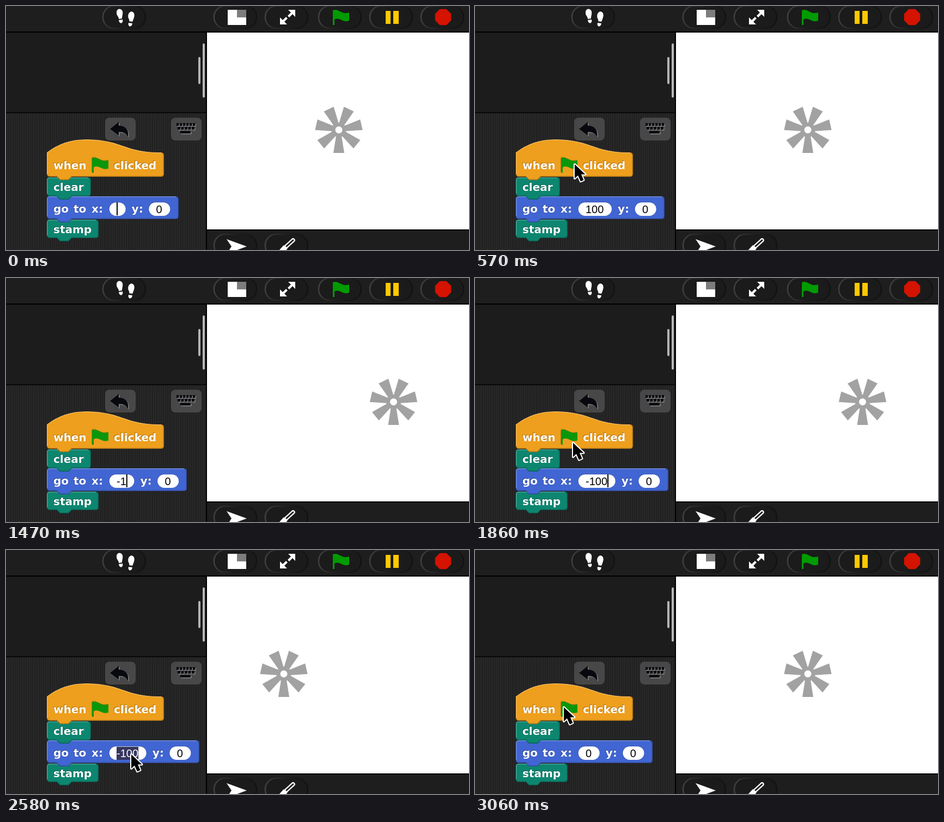
These frames come from a looping animation (850 by 450 pixels, 3180 ms). An HTML page with a canvas:

```html
<!DOCTYPE html>
<html lang="en">
<head>
<meta charset="utf-8">
<title>Block script demo</title>
<style>
  html, body { margin: 0; height: 100%; overflow: hidden; background: #1e1e1e; }
  canvas { display: block; }
</style>
</head>
<body>
<canvas id="view" width="850" height="450"></canvas>
<script>
const ctx = document.getElementById('view').getContext('2d');
const LOOP = 3180, STEP = 30;
const LABEL = 'bold 20px "DejaVu Sans", Verdana, sans-serif';
const NUMBER = '20px "Liberation Sans", Arial, sans-serif';
const ORANGE = '#ed9f1d', TEAL = '#0d8670', BLUE = '#4165d2';
const PLAIN = 0, CARET = 1, SELECTED = 2;

// time, value of x, state of the field
const edits = [
  [0, '', CARET], [120, '1', CARET], [210, '10', CARET], [300, '100', CARET],
  [510, '100', PLAIN], [1140, '100', SELECTED], [1350, '-', CARET],
  [1440, '-1', CARET], [1530, '-10', CARET], [1620, '-100', CARET],
  [1920, '-100', PLAIN], [2490, '-100', SELECTED], [2670, '', CARET],
  [2790, '0', CARET], [2970, '0', PLAIN]
];
// time, centre of the wheel
const moves = [[0, 611], [690, 711.5], [1980, 510], [3030, 611]];
// each trip of the pointer: time, x, y
const trips = [
  [[330, 228, 374], [540, 181, 289], [690, 181, 289], [930, 218, 342], [990, 222, 366], [1320, 222, 366]],
  [[1710, 222, 372], [1860, 178, 301], [1950, 175, 290], [2220, 175, 290], [2460, 228, 374], [2640, 228, 374]],
  [[2820, 228, 374], [3000, 161, 287], [3180, 161, 287]]
];

const shapes = {
  flag: new Path2D('M0 1C10-4 16 10 30 5V20C18 25 13 12 3 18V28H0Z'),
  pointer: new Path2D('M0 0V26L6 20.5L11 31.5L16.5 29L12 18.5H19.5Z'),
  expand: new Path2D('M518 7H531V20L526 15L520 21L517 18L523 12Z M516 34H503V21L508 26L514 20L517 23L511 29Z'),
  steps: new Path2D('M203 13C202 4 212 3 214 10C215 15 213 18 213 23L207 24C207 19 203 18 203 13Z M207 26L214 25C216 33 208 34 207 26Z M225 23C222 15 228 8 233 11C238 15 235 22 232 29L226 28C227 26 226 25 225 23Z M225 31L232 32C231 40 223 39 225 31Z'),
  turtle: new Path2D('M405 430L442 443.5L405 457L414 443.5Z'),
  undo: new Path2D('M191 227L207 214V220.5C220 221 226 229 224 241C220 234 215 232 207 232.5V239Z')
};

const latest = (list, t) => list.findLast(item => item[0] <= t);

function box(x, y, w, h, color) {
  ctx.fillStyle = color;
  ctx.fillRect(x, y, w, h);
}

function round(x, y, w, h, r, color) {
  ctx.beginPath();
  ctx.roundRect(x, y, w, h, r);
  ctx.fillStyle = color;
  ctx.fill();
}

function fill(path, color, x = 0, y = 0) {
  ctx.save();
  ctx.translate(x, y);
  ctx.fillStyle = color;
  ctx.fill(path);
  ctx.restore();
}

function polygon(points, color) {
  ctx.beginPath();
  points.forEach(p => ctx.lineTo(...p));
  ctx.fillStyle = color;
  ctx.fill();
}

function text(words, x, y, color, font) {
  ctx.font = font;
  ctx.fillStyle = color;
  ctx.fillText(words, x, y);
}

function label(words, x, y) {
  text(words, x - 1, y - 1, 'rgba(0,0,0,.3)', LABEL);
  text(words, x, y, '#fff', LABEL);
}

function pill(x, y) {
  const edge = ctx.createLinearGradient(x, y, x + 78, y + 12);
  edge.addColorStop(0, '#444');
  edge.addColorStop(.2, '#303030');
  edge.addColorStop(.5, '#1e1e1e');
  edge.addColorStop(1, '#121212');
  round(x, y, 78, 41, 20, '#1b1b1b');
  ctx.strokeStyle = edge;
  ctx.lineWidth = 2.5;
  ctx.stroke();
}

function toolbar() {
  [178, 382, 476, 574, 668, 762].forEach(x => pill(x, 0));
  [382, 476].forEach(x => pill(x, 421));
  fill(shapes.steps, '#fff');
  box(407, 7, 34, 28, '#fff');
  box(424, 7, 17, 14, '#7d7d7d');
  fill(shapes.expand, '#fff');
  fill(shapes.flag, '#009b00', 600, 7);
  box(697, 9, 9, 24, '#ffc800');
  box(711, 9, 10, 24, '#ffc800');
  polygon(Array.from({length: 8}, (_, i) => {
    const a = (i + .5) * Math.PI / 4;
    return [802.5 + 16 * Math.cos(a), 20.5 + 16 * Math.sin(a)];
  }), '#d41300');
  fill(shapes.turtle, '#fff');
  ctx.lineCap = 'round';
  for (const [color, width] of [['#fff', 7.5], ['#1b1b1b', 3]]) {
    ctx.strokeStyle = color;
    ctx.lineWidth = width;
    ctx.beginPath();
    ctx.moveTo(527, 432);
    ctx.lineTo(515, 443);
    ctx.stroke();
  }
  ctx.lineCap = 'butt';
  polygon([[510, 441], [517, 447], [513, 452], [500, 452]], '#fff');
}

function panes() {
  box(0, 0, 850, 450, '#1e1e1e');
  box(0, 47, 850, 2, '#000');
  box(0, 49, 367, 147, '#1c1c1c');
  box(0, 197, 367, 253, '#282828');
  for (let x = 0; x < 367; x += 4) box(x, 197, 2, 253, '#212121');
  box(0, 196, 367, 1.5, '#000');
  box(367, 47, 2, 403, '#000');
  box(369, 49, 481, 363, '#fff');
  box(369, 412, 481, 1.5, '#000');
  round(361, 69, 4, 100, 2, '#b9b9b9');
  round(353, 94, 4, 50, 2, '#b3b3b3');
}

function keyboard(dx, color) {
  for (let i = 0; i < 6; i++) {
    box(313 + i * 6 + dx, 216 + dx, 4.5, 5, color);
    if (i < 5) box(315 + i * 6.5 + dx, 223 + dx, 5, 5, color);
  }
  box(320 + dx, 230.5 + dx, 19, 4.5, color);
}

function scriptButtons() {
  round(182, 206, 56, 42, 8, 'rgba(78,78,78,.85)');
  round(303, 206, 56, 42, 8, 'rgba(78,78,78,.85)');
  fill(shapes.undo, '#858585', 1.5, 1.5);
  fill(shapes.undo, '#08080f');
  keyboard(1.5, '#858585');
  keyboard(0, '#08080f');
}

function block(y, right, bottom, color, hat) {
  const top = hat
    ? `M75 ${y + 24}A114 114 0 0 1 145 ${y}C215 ${y} 215 ${y + 24} 285 ${y + 24}`
    : `M75 ${y + 5}Q75 ${y} 80 ${y}H${right - 5}`;
  const shoulder = hat ? y + 24 : y;
  const rim = `Q${right} ${shoulder} ${right} ${shoulder + 5}V${bottom - 5}Q${right} ${bottom} ${right - 5} ${bottom}` +
    `H121L115 ${bottom + 6}H99L93 ${bottom}H80Q75 ${bottom} 75 ${bottom - 5}`;
  const outline = new Path2D(top + rim + 'Z');
  ctx.save();
  ctx.clip(outline);
  fill(outline, color);
  ctx.lineWidth = 3;
  ctx.strokeStyle = 'rgba(0,0,0,.25)';
  ctx.stroke(new Path2D(`M${right - 5} ${shoulder}` + rim));
  ctx.strokeStyle = 'rgba(255,255,255,.25)';
  ctx.stroke(new Path2D(`M75 ${bottom - 5}V${hat ? y + 24 : y + 5}` + top.replace('M', 'L')));
  ctx.restore();
}

function fieldWidth(value) {
  ctx.font = NUMBER;
  return Math.max(ctx.measureText(value).width, 2) + 28.6;
}

function field(x, value, state) {
  const width = fieldWidth(value), ink = ctx.measureText(value).width;
  round(x, 361.5, width, 25.5, 12.75, '#34509f');
  round(x + .7, 362.2, width - .7, 24.8, 12.4, '#fff');
  if (state === SELECTED) box(x + 14, 363, ink, 24, '#36365d');
  text(value, x + 14, 382, state === SELECTED ? '#fff' : '#000', NUMBER);
  if (state === CARET) box(x + 14 + ink, 362, 2, 24, '#000');
}

function script(value, state) {
  const end = 189 + fieldWidth(value);
  block(394, 170, 428, TEAL);
  block(351, Math.round(end + 97), 393, BLUE);
  block(316, 156, 351, TEAL);
  block(246, 290, 315, ORANGE, true);
  label('when', 87, 301);
  fill(shapes.flag, 'rgba(90,70,0,.4)', 157, 278.5);
  fill(shapes.flag, '#0b970b', 158, 279.5);
  label('clicked', 198, 301);
  label('clear', 87, 341);
  label('go', 87, 381);
  label('to', 124, 381);
  label('x:', 157, 381);
  label('stamp', 87, 419);
  field(189, value, state);
  label('y:', end + 11, 381);
  field(end + 42, '0', PLAIN);
}

function wheel(x) {
  const gray = '#a2a2a2';
  ctx.save();
  ctx.translate(x, 228.5);
  for (let i = 0; i < 7; i++) {
    polygon([[-4.5, 8], [4.5, 8], [10, 42.5], [-10, 42.5]], gray);
    ctx.rotate(Math.PI * 2 / 7);
  }
  ctx.beginPath();
  ctx.arc(0, 0, 10, 0, 7);
  ctx.lineWidth = 7;
  ctx.strokeStyle = gray;
  ctx.stroke();
  ctx.restore();
}

function pointer(t) {
  const trip = trips.find(p => t >= p[0][0] && t < p.at(-1)[0]);
  if (!trip) return;
  const i = trip.findLastIndex(p => p[0] <= t);
  const [t0, x0, y0] = trip[i], [t1, x1, y1] = trip[i + 1];
  const k = (t - t0) / (t1 - t0), e = k * k * (3 - 2 * k);
  ctx.save();
  ctx.translate(x0 + (x1 - x0) * e + 2, y0 + (y1 - y0) * e + 3);
  ctx.strokeStyle = '#fff';
  ctx.lineWidth = 4;
  ctx.lineJoin = 'round';
  ctx.stroke(shapes.pointer);
  fill(shapes.pointer, '#000');
  ctx.restore();
}

function draw(now) {
  const t = Math.floor(now % LOOP / STEP) * STEP;
  const [, value, state] = latest(edits, t);
  panes();
  toolbar();
  scriptButtons();
  script(value, state);
  wheel(latest(moves, t)[1]);
  pointer(t);
}

const start = performance.now();
function tick() {
  draw(performance.now() - start);
  requestAnimationFrame(tick);
}
tick();
</script>
</body>
</html>
```
